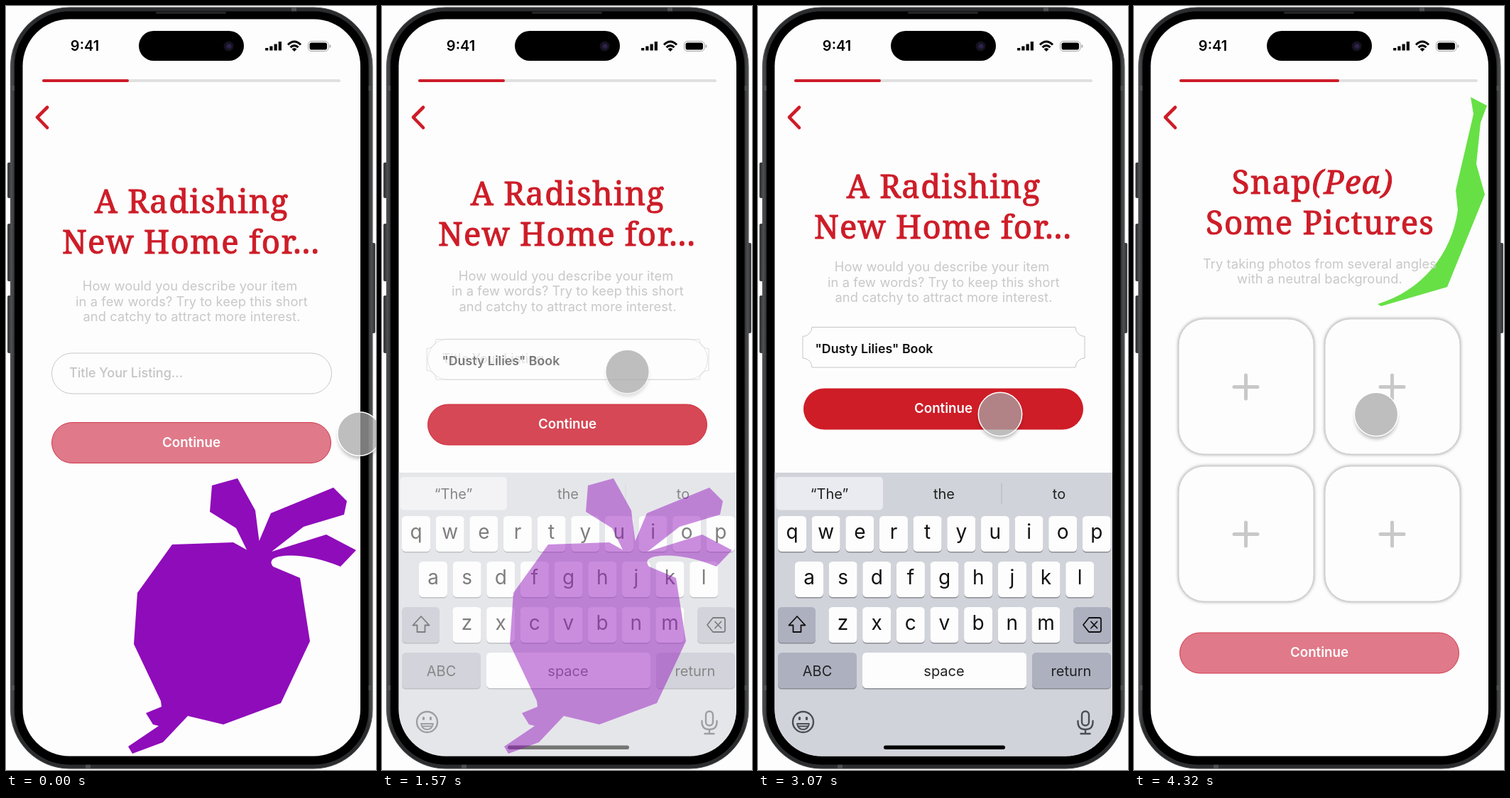
An HTML page for the animation above (4630 ms loop, 521 px wide and 1074 px high).

```html
<!DOCTYPE html>
<html lang="en">
<head>
<meta charset="utf-8">
<title>Listing flow</title>
<style>
  html, body { margin: 0; width: 100%; height: 100%; overflow: hidden; background: #fdfdfd; }
  svg { display: block; width: 100%; height: 100%; font-family: Inter, sans-serif; }
  .title { font: 500 45.5px "Noto Serif", serif; letter-spacing: 1.25px; fill: #cd1d28; stroke: #cd1d28; stroke-width: 1; text-anchor: middle; }
  .note { font-size: 18.3px; letter-spacing: .1px; fill: #c8c8c8; text-anchor: middle; }
  .label { font-size: 18.7px; font-weight: 600; fill: #fff; text-anchor: middle; }
  .key { font-size: 28px; fill: #111; text-anchor: middle; }
  .word { font-size: 20px; fill: #222; text-anchor: middle; }
  .line { fill: none; stroke-linecap: round; stroke-linejoin: round; }
</style>
</head>
<body>
<svg viewBox="0 0 521 1074" xmlns="http://www.w3.org/2000/svg">
  <defs>
    <clipPath id="screen"><rect x="23.5" y="18.5" width="475.5" height="1036" rx="66"/></clipPath>
    <mask id="outside" maskUnits="userSpaceOnUse" x="-50" y="-50" width="100" height="100">
      <rect x="-50" y="-50" width="100" height="100" fill="#fff"/><circle r="30.5"/>
    </mask>
    <filter id="soft" x="-15%" y="-15%" width="130%" height="130%"><feGaussianBlur stdDeviation="2.2"/></filter>
    <filter id="drop" x="-30%" y="-30%" width="160%" height="160%"><feGaussianBlur stdDeviation="2.5"/></filter>
    <linearGradient id="metal" x2="1" y2="0">
      <stop offset="0" stop-color="#555759"/><stop offset=".012" stop-color="#2b2c2e"/>
      <stop offset=".988" stop-color="#2b2c2e"/><stop offset="1" stop-color="#555759"/>
    </linearGradient>
  </defs>

  <!-- phone body -->
  <g fill="#3a3b3d">
    <rect x="2" y="220" width="7" height="50" rx="2"/>
    <rect x="2" y="306" width="7" height="81" rx="2"/>
    <rect x="2" y="407" width="7" height="81" rx="2"/>
    <rect x="513" y="333" width="7" height="127" rx="2"/>
  </g>
  <rect x="6.5" y="2" width="509.5" height="1070" rx="83" fill="url(#metal)" stroke="#4a4b4d"/>
  <g fill="#4d4f51">
    <rect x="6" y="112" width="7" height="7"/><rect x="509" y="112" width="7" height="7"/>
    <rect x="6" y="955" width="7" height="7"/><rect x="509" y="955" width="7" height="7"/>
    <rect x="402" y="2" width="7" height="6"/><rect x="112" y="1066" width="7" height="6"/>
  </g>
  <rect x="12" y="7.5" width="498.500" height="1059" rx="77" fill="#000"/>
  <rect x="211" y="8" width="99" height="3" rx="1.5" fill="#242527"/>
  <rect x="23.5" y="18.5" width="475.5" height="1036" rx="66" fill="#fdfdfd"/>

  <g clip-path="url(#screen)">
    <g id="page2">
      <g id="bar2"></g>
      <path fill="#67e046" d="M474 128L497 140 488 164 482 222 494 265 441 395 348 422 343 419C405 400 447 350 456 287L453 259 478 152Z"/>
      <g class="title">
        <text x="251.5" y="264">Snap<tspan font-style="italic">(Pea)</tspan></text>
        <text x="262" y="321">Some Pictures</text>
      </g>
      <g class="note">
        <text x="261.5" y="369">Try taking photos from several angles</text>
        <text x="261.5" y="390">with a neutral background.</text>
      </g>
      <g id="cards"></g>
      <rect x="64.5" y="881" width="393" height="57" rx="28.5" fill="#e07989" stroke="#cf3a4c"/>
      <text class="label" x="261" y="915">Continue</text>
    </g>

    <g id="page1">
      <g id="bar1"></g>
      <g id="title1" class="title">
        <text x="261.5" y="291">A Radishing</text>
        <text x="260.5" y="348">New Home for...</text>
      </g>
      <g id="note1" class="note">
        <text x="259" y="400">How would you describe your item</text>
        <text x="261.5" y="421.5">in a few words? Try to keep this short</text>
        <text x="261.5" y="443">and catchy to attract more interest.</text>
      </g>
      <g id="field">
        <rect id="empty" x="64.5" y="488" width="394" height="57" rx="28.5" fill="none" stroke="#c6c6c6"/>
        <path id="ticket" fill="none" stroke="#c6c6c6"
          d="M76 488.500H447a13 13 0 0 0 13 13V532a13 13 0 0 0 -13 13H76a13 13 0 0 0 -13 -13V501.500a13 13 0 0 0 13 -13Z"/>
        <text id="hint" y="522" font-size="18" font-weight="500" fill="#c4c4c4">Title Your Listing...</text>
        <text id="value" y="524.5" font-size="17.8" font-weight="600" fill="#111">"Dusty Lilies" Book</text>
      </g>
      <g id="button1">
        <rect id="pill" x="64.5" y="585.5" width="393" height="57" rx="28.5"/>
        <text class="label" x="261" y="619.5">Continue</text>
      </g>
      <g id="keyboard"></g>
      <path id="radish" fill="#8f0cba" d="M234 757L320 754 339 764.500 324 734 287 711 290 674 326 664 351 709
        356.500 752 373 713 461 677 480 696 476 715 419 732 374 767 451 743 493 765 471 788Q420 768 384 774
        Q368 778 376 788L414 804 428 893 387 980 306 1010 256 998 221 1035 178 1051 172 1041 215 1012
        207 1010 197 994 219 985 218 977 180 897 185 825Z"/>
    </g>

    <path class="line" d="M58 142.500L44 156.500 58 171" stroke="#cd1d28" stroke-width="4.6"/>
  </g>

  <!-- status bar -->
  <rect x="187" y="35" width="148" height="42" rx="21"/>
  <circle cx="313.5" cy="56.5" r="7" fill="#15121f"/>
  <circle cx="314" cy="56.5" r="3.5" fill="#2c2148"/>
  <text x="111" y="63" font-size="20" font-weight="600" text-anchor="middle">9:41</text>
  <path d="M367.200 62.500V59M373.400 62.500V56.500M379.600 62.500V53.500M385.800 62.500V50" stroke="#000" stroke-width="4.2"/>
  <g class="line" stroke="#000" stroke-width="3" style="stroke-linecap:butt">
    <path d="M397 54.500Q406 45.500 415 54.500M400.500 58.200Q406 53 411.500 58.200"/>
  </g>
  <path d="M402.500 60.500Q406 57.500 409.500 60.500L406 64Z"/>
  <rect x="425.5" y="49.5" width="28.5" height="14" rx="4.5" fill="none" stroke="#a5a5a5"/>
  <rect x="427.5" y="51.5" width="24.5" height="10" rx="2.8"/>
  <path d="M455.500 54v5q2 -.6 2 -2.500t-2 -2.500" fill="#a5a5a5"/>

  <g id="cursor">
    <g mask="url(#outside)"><circle id="shade" cy="5" r="30" filter="url(#drop)"/></g>
    <circle r="30.5" fill="#a8a8a8" fill-opacity=".74"/>
    <circle id="ring" r="30.7" fill="none" stroke="#fff" stroke-width="1.5"/>
  </g>
</svg>
<script>
const LOOP = 4630;
const $ = id => document.getElementById(id);
const set = (id, attrs) => { for (const k in attrs) $(id).setAttribute(k, attrs[k]); };
const rect = (x, y, w, h, r, fill) =>
  `<rect x="${x}" y="${y}" width="${w}" height="${h}" rx="${r}" fill="${fill}"/>`;
const text = (cls, x, y, s) => `<text class="${cls}" x="${x}" y="${y}">${s}</text>`;

const progressBar = (x, done) =>
  rect(x, 103, 420, 4, 2, '#e0e0e0') + rect(x, 103, done, 4, 2, '#cd1d28');

const keyCap = (x, y, w, fill = '#fdfdfd') =>
  rect(x, y + 1.5, w, 50, 5.5, '#8b8d93') + rect(x, y, w, 50, 5.5, fill);

function keyboard() {
  const grey = '#adb0bf';
  let out = rect(23, 656, 477, 400, 0, '#d1d3da') + rect(25.5, 662, 150.5, 46.5, 5, '#eaebf0');
  out += text('word', 100.5, 693, '“The”') + text('word', 262, 693, 'the') + text('word', 424, 693, 'to');
  out += rect(342.5, 671, 1, 29, 0, '#b6b8bf');
  [['qwertyuiop', 28, 717], ['asdfghjkl', 52, 781], ['zxcvbnm', 99.5, 845]].forEach(([row, x0, y]) => {
    [...row].forEach((c, i) => {
      const x = x0 + i * 47.65;
      out += keyCap(x, y, 40) + text('key', x + 20, y + 32, c);
    });
  });
  out += keyCap(28, 845, 53, grey) + keyCap(444, 845, 53, grey);
  out += keyCap(28, 909, 111, grey) + keyCap(147, 909, 231) + keyCap(386, 909, 111, grey);
  out += text('word', 83.5, 941.5, 'ABC') + text('word', 262, 941.5, 'space') + text('word', 441, 941.5, 'return');
  out += `<g class="line" stroke="#111" stroke-width="1.8">
    <path d="M55 858L43.500 870.500H49.500V880H60.500V870.500H66.500Z"/>
    <path d="M466 860H480.500Q483 860 483 862.500V877.500Q483 880 480.500 880H466L458 870ZM469 865.500L477.500 874.500M477.500 865.500L469 874.500"/></g>`;
  out += `<g class="line" stroke="#4c4e54" stroke-width="2.4">
    <circle cx="63.5" cy="1006.5" r="14.5"/>
    <path d="M55 1009H72Q70.500 1017 63.500 1017T55 1009M57 1012.500H70" stroke-width="1.8"/>
    <path d="M58.500 1000.500V1002.500M68.500 1000.500V1002.500" stroke-width="3.2"/>
    <rect x="456" y="991.5" width="10" height="20" rx="5"/>
    <path d="M450.500 1005V1007.500Q451 1017 461 1017T471.500 1007.500V1005M461 1017V1023M454.500 1023H467.500"/></g>`;
  return out + rect(177, 1039.5, 171, 5.5, 2.75, '#000');
}

function cards() {
  let out = '';
  for (const y of [440, 647]) for (const x of [63, 269]) {
    const box = `x="${x}" y="${y}" width="190" height="190" rx="36"`;
    out += `<rect ${box} fill="#aaa" stroke="#aaa" stroke-width="2" filter="url(#soft)"/>
      <rect ${box} fill="#fdfdfd" stroke="#d0d0d0"/>
      <path class="line" d="M${x + 78} ${y + 95.5}h33m-16.500 -16.500v33" stroke="#c8c8c8" stroke-width="5"/>`;
  }
  return out;
}

$('bar1').innerHTML = progressBar(51, 122);
$('bar2').innerHTML = progressBar(64, 225);
$('keyboard').innerHTML = keyboard();
$('cards').innerHTML = cards();

const span = (t, a, b) => Math.min(1, Math.max(0, (t - a) / (b - a)));
const easeOut = u => 1 - (1 - u) ** 1.66;
const smooth = u => u * u * (3 - 2 * u);
const mix = (a, b, u) => a + (b - a) * u;
const blend = (a, b, u) => `rgb(${a.map((v, i) => Math.round(mix(v, b[i], u)))})`;
const shift = (id, y) => set(id, { transform: `translate(0 ${y})` });

function draw(t) {
  // p: keyboard comes in, q: first page dissolves off the second
  const p = easeOut(span(t, 1460, 1760));
  const q = easeOut(span(t, 3475, 3775));
  shift('title1', -21 * p);
  shift('note1', -27 * p);
  shift('field', -37 * p);
  shift('button1', -47.5 * p);
  const x = mix(89, 80.5, p);
  set('hint', { x, opacity: 1 - p });
  set('value', { x, opacity: p });
  set('empty', { opacity: 1 - p });
  set('ticket', { opacity: p });
  set('pill', {
    fill: blend([224, 121, 137], [206, 29, 39], p),
    stroke: blend([207, 58, 76], [206, 29, 39], p)
  });
  set('keyboard', { opacity: p });
  set('radish', { opacity: 1 - p });
  set('page1', { opacity: 1 - q });
  set('page2', { opacity: easeOut(q) });

  const m = smooth(span(t, 380, 880)), n = smooth(span(t, 2640, 3070));
  const cx = mix(497.5, 345.5, m) - 4.5 * n;
  const cy = mix(601.5, 514, m) + 60 * n;
  const press = smooth(span(t, 1240, 1400)) - smooth(span(t, 1480, 1660))
    + smooth(span(t, 3250, 3400)) - smooth(span(t, 3500, 3760));
  set('cursor', { transform: `translate(${cx} ${cy})` });
  set('shade', { opacity: .25 * (1 - press) });
  set('ring', { opacity: 1 - .65 * press });
}

const start = performance.now();
function tick() {
  draw((performance.now() - start) % LOOP);
  requestAnimationFrame(tick);
}
tick();
</script>
</body>
</html>
```
